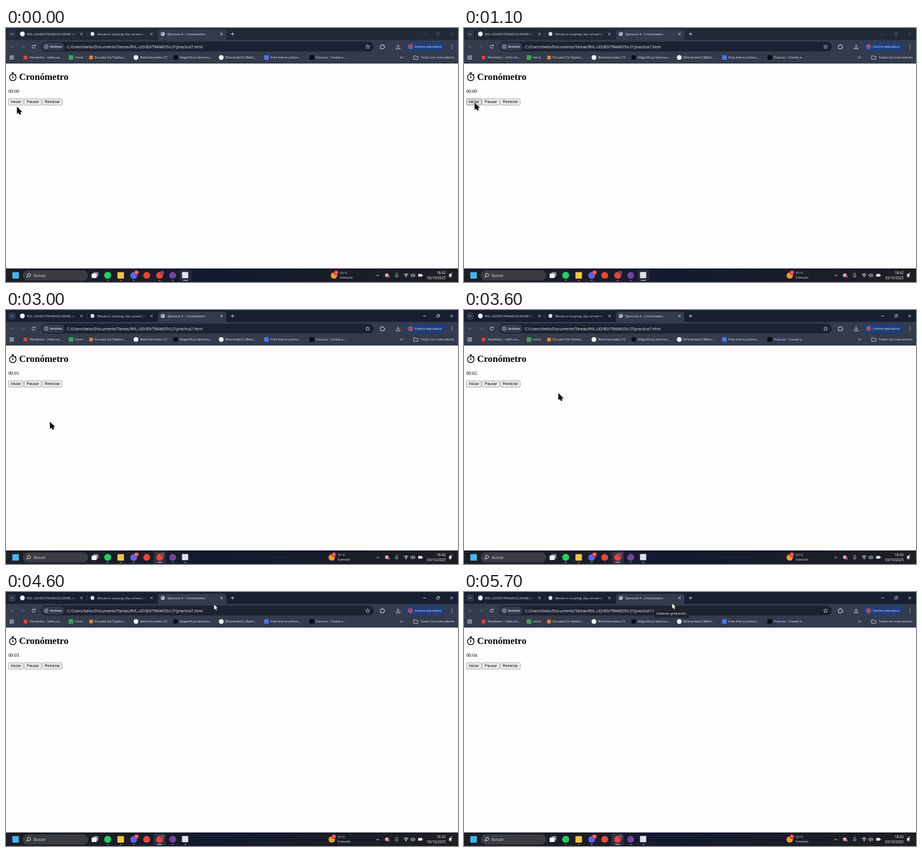
Recreate the animation shown at these times as an HTML page with a canvas. Size 800x450 px, loop 5.8 s.

```html
<!DOCTYPE html>
<html lang="es">
<head>
<meta charset="utf-8">
<title>Cronómetro</title>
<style>
html, body { margin: 0; width: 100%; height: 100%; overflow: hidden; background: #fefefe; }
canvas { display: block; width: 800px; height: 450px; }
</style>
</head>
<body>
<canvas id="stage" width="800" height="450"></canvas>
<script>
const ctx = document.getElementById('stage').getContext('2d');
const LOOP = 5800, STEP = 100;
const UI = '"Open Sans", "Noto Sans", sans-serif';
const SERIF = '"Liberation Serif", "Times New Roman", serif';
const ARIAL = '"Liberation Sans", Arial, sans-serif';
const BAR = '#333b4c', FIELD = '#1c2230', INK = '#dfe3ec', MUTED = '#626a7c';

function box(x, y, w, h, r, fill, stroke, width = 0.7) {
  ctx.beginPath();
  ctx.roundRect(x, y, w, h, r);
  if (fill) { ctx.fillStyle = fill; ctx.fill(); }
  if (stroke) { ctx.strokeStyle = stroke; ctx.lineWidth = width; ctx.stroke(); }
}

function disc(x, y, r, fill, stroke, width = 0.9) {
  ctx.beginPath();
  ctx.arc(x, y, r, 0, Math.PI * 2);
  if (fill) { ctx.fillStyle = fill; ctx.fill(); }
  if (stroke) { ctx.strokeStyle = stroke; ctx.lineWidth = width; ctx.stroke(); }
}

function square(x, y, size, fill, r = 1) {
  box(x - size / 2, y - size / 2, size, size, r, fill);
}

function line(pts, color = INK, width = 0.9) {
  ctx.beginPath();
  for (let i = 0; i < pts.length; i += 2) ctx.lineTo(pts[i], pts[i + 1]);
  ctx.strokeStyle = color;
  ctx.lineWidth = width;
  ctx.stroke();
}

function arc(x, y, r, from, to, color = INK, width = 0.9) {
  ctx.beginPath();
  ctx.arc(x, y, r, from, to);
  ctx.strokeStyle = color;
  ctx.lineWidth = width;
  ctx.stroke();
}

function shape(pts, fill, stroke, width = 0.8) {
  ctx.beginPath();
  for (let i = 0; i < pts.length; i += 2) ctx.lineTo(pts[i], pts[i + 1]);
  ctx.closePath();
  if (fill) { ctx.fillStyle = fill; ctx.fill(); }
  if (stroke) { ctx.strokeStyle = stroke; ctx.lineWidth = width; ctx.stroke(); }
}

function text(str, x, y, size = 6, color = INK, family = UI, weight = 400, align = 'left') {
  ctx.font = `${weight} ${size}px ${family}`;
  ctx.textAlign = align;
  ctx.fillStyle = color;
  ctx.fillText(str, x, y);
}

function cross(x, y, r, color = INK) {
  line([x - r, y - r, x + r, y + r], color);
  line([x - r, y + r, x + r, y - r], color);
}

function fadedTitle(str, x, end) {
  const fade = ctx.createLinearGradient(end - 12, 0, end, 0);
  fade.addColorStop(0, '#d3d8e3');
  fade.addColorStop(1, 'rgba(211,216,227,0)');
  text(str, x, 12.8, 6, fade);
}

function tabs(active) {
  ctx.fillStyle = active ? '#181f30' : '#232a37';
  ctx.fillRect(0, 0, 800, 22);
  box(4, 4, 13, 13, 4, '#2d3547');
  line([8.5, 9.7, 10.5, 11.7, 12.5, 9.7]);

  box(269, 3, 121, 22, 5, BAR);
  disc(29, 10.5, 4.2, '#f2f4f8');
  fadedTitle('RVL-UD/B3/TRAMO5/LEEME.md', 37, 125);
  cross(133.5, 10.5, 2);
  line([143.5, 6.5, 143.5, 15], '#48516a', 0.7);
  disc(153, 10.5, 3.4, '#d9dde5');
  fadedTitle('Movie to looping clip converter', 161.5, 248);
  cross(257.5, 10.5, 2);

  disc(277.5, 10.5, 3.6, '#c4cad6');
  shape([275, 8.5, 277.5, 8, 278, 10, 276, 11.5], '#5b6376');
  shape([278.5, 11, 280.3, 10.5, 279, 13], '#5b6376');
  text('Ejercicio 4 - Cronómetro', 286, 12.8, 5.97, '#f0f2f6');
  cross(381.5, 10.5, 2, '#fff');
  line([398, 10.5, 404, 10.5]);
  line([401, 7.5, 401, 13.5]);

  const c = active ? '#e6e9f0' : '#5c6473';
  line([738.5, 10.5, 743.5, 10.5], c, 0.8);
  box(762.3, 8.8, 4, 4, 0.7, null, c, 0.8);
  line([763.7, 7.8, 767.3, 7.8, 767.3, 11.5], c, 0.6);
  cross(788.8, 10.5, 2.3, c);
}

function toolbar() {
  ctx.fillStyle = BAR;
  ctx.fillRect(0, 21, 800, 42);
  for (const [x, d] of [[11, -1], [30, 1]]) {
    line([x - 3, 33, x + 3, 33], MUTED);
    line([x + d * 0.5, 30.3, x + d * 3, 33, x + d * 0.5, 35.7], MUTED);
  }
  arc(49, 33, 2.8, 0.3, 5.5);
  shape([52.3, 29.5, 52.3, 32.3, 49.6, 32.3], INK);

  box(62, 24.3, 589, 17.2, 8.6, FIELD);
  box(64, 26, 39.5, 13.8, 6.9, '#343c4e');
  disc(71.3, 33, 3, null, INK, 0.8);
  line([71.3, 32.5, 71.3, 34.7], INK, 0.8);
  line([71.3, 31, 71.3, 31.7], INK, 0.8);
  text('Archivo', 78, 35.2, 5.8, '#f0f2f6', UI, 600);
  text('C:/Users/belio/Documents/Tareas/RVL-UD/B3/TRAMO5/LI7/practica7.html', 108, 35.6, 7, '#eef0f5');

  const star = [];
  for (let i = 0; i < 10; i++) {
    const a = i * Math.PI / 5 - Math.PI / 2, r = i % 2 ? 1.7 : 3.8;
    star.push(640 + r * Math.cos(a), 33.2 + r * Math.sin(a));
  }
  shape(star, null, INK, 0.7);

  line([662.8, 30.6, 665, 30.6, 665, 29.3, 667, 29.3, 667, 30.6, 669, 30.6, 669, 32.5,
    670.2, 32.5, 670.2, 34.5, 669, 34.5, 669, 36.8, 662.8, 36.8, 662.8, 30.6], INK, 0.9);
  line([694, 29, 694, 34.3]);
  line([691.8, 32.2, 694, 34.4, 696.2, 32.2]);
  line([690.6, 34.8, 690.6, 36.9, 697.4, 36.9, 697.4, 34.8]);

  box(706.5, 24.8, 71, 16.4, 8.2, '#1f3f7c');
  disc(716, 33, 4.6, '#a0505c');
  text('Centro educativo', 723.5, 35.2, 6, '#e2eafc');
  for (const dy of [-3, 0, 3]) disc(789.3, 33 + dy, 0.8, INK);
}

function bookmarks(hover) {
  if (hover) {
    ctx.globalAlpha = hover;
    box(292, 45.5, 80, 14, 7, '#454d60');
    ctx.globalAlpha = 1;
  }
  for (const x of [6.8, 10.8]) for (const y of [49, 53]) box(x, y, 2.6, 2.6, 0.3, null, INK, 0.8);
  square(34.5, 52.2, 6.5, '#e0463b');
  square(115, 52.2, 8, '#39a852');
  square(150.5, 52.2, 6.5, '#ee8432');
  disc(230, 52.2, 4.2, '#f2f4f8');
  square(300.3, 52.2, 7.5, '#0b0d12', 0);
  disc(381, 52.2, 4.2, '#f2f4f8');
  square(461, 52.2, 8, '#4d74f2');
  square(541.3, 52.2, 8.4, '#0b0d12');
  const labels = [
    ['Recibidos - belio.va...', 42], ['Inicio', 122], ['Escuela De Tejidos...', 157],
    ['BelioVarandes-72', 237.5], ['Magníficas láminas...', 307.5], ['BVarandesO (Belio...', 388],
    ['Free line-to-photo...', 468], ['Trazuva - Create a...', 548], ['Todos los marcadores', 734]
  ];
  for (const [label, x] of labels) text(label, x, 54.4, 5.9);
  for (const x of [698, 700.7]) line([x, 50.4, x + 1.8, 52.2, x, 54], INK, 0.8);
  shape([721.5, 49.3, 724.2, 49.3, 725.3, 50.4, 729, 50.4, 729, 55.4, 721.5, 55.4], null, INK, 0.8);
}

function button(label, x, w, over) {
  box(x + 0.4, 125.4, w - 0.8, 11.2, 1.6, over ? '#e2e4e6' : '#efefef', over ? '#55606c' : '#888', 0.75);
  text(label, x + w / 2, 133, 6.94, '#000', ARIAL, 400, 'center');
}

function page(t, x, y) {
  ctx.fillStyle = '#fefefe';
  ctx.fillRect(0, 63, 800, 363);
  disc(12, 87.6, 5.8, null, '#000', 1.4);
  line([12, 81.8, 12, 79.6], '#000', 1.7);
  line([9.8, 79.4, 14.2, 79.4], '#000', 1.4);
  line([16.3, 82, 17.8, 83.5], '#000', 1.4);
  line([12, 88, 12, 83.8], '#000', 1.1);
  disc(12, 87.8, 1.1, '#000');
  text('Cronómetro', 23.2, 92, 16.67, '#000', SERIF, 700);

  const secs = Math.max(0, Math.floor((t - 1100) / 1000));
  text('00:' + String(secs).padStart(2, '0'), 4.2, 115, 8.33, '#000', SERIF);
  button('Iniciar', 4, 27, x < 31 && y < 137);
  button('Pausar', 32, 31);
  button('Reiniciar', 64.3, 35.5);
}

function badge(x, y, label) {
  disc(x, y, 4, '#d8324a');
  text(label, x, y + 1.7, 4.6, '#fff', UI, 600, 'center');
}

function taskbar(t, active) {
  const bg = ctx.createLinearGradient(0, 0, 800, 0);
  bg.addColorStop(0, '#1c1f26');
  bg.addColorStop(0.3, '#1a1d29');
  bg.addColorStop(0.46, '#121a31');
  bg.addColorStop(0.7, '#191d29');
  bg.addColorStop(1, '#1e1e23');
  ctx.fillStyle = bg;
  ctx.fillRect(0, 426, 800, 24);

  square(17, 438.3, 11.6, '#45b5ef');
  box(30, 430, 115, 17, 8.5, '#3a3c41', '#494b50', 0.5);
  disc(40.7, 437.6, 2.8, null, '#f0f1f4', 1);
  line([38.7, 439.7, 36.6, 441.9], '#f0f1f4', 1.1);
  text('Buscar', 49, 441, 6.7, '#d7d9df');

  const focus = active ? 272 : 317.5;
  box(focus - 10.5, 428, 21, 20.5, 2.5, active ? '#303440' : '#282939');

  box(154.5, 432.5, 9, 8, 1, '#858a96');
  box(151.5, 435, 9, 8, 1, '#f0f1f4');
  disc(180, 438.2, 6.2, '#27cc62');
  square(203, 438.2, 11.5, '#f5c34b');
  disc(226, 438.4, 6, '#5865e8');
  badge(231, 433.5, '9+');
  disc(249, 438.2, 6.1, '#e4473c');
  disc(272, 438.2, 6.1, '#e4473c');
  disc(276.7, 433.7, 3.4, '#7d4660');
  disc(295, 438.2, 6.1, '#71449f');
  square(317, 437.8, 11, '#dce1ea');
  for (const x of [180, 203, 226, 295]) box(x - 1.7, 446.6, 3.4, 1.2, 0.6, '#8b8f9a');
  for (const x of [272, 317.5]) {
    const on = x === focus, w = on ? 8.6 : 3.4;
    box(x - w / 2, 446.6, w, 1.3, 0.6, on ? '#d993c2' : '#8b8f9a');
  }

  const dx = -4 * ease((t - 100) / 400);
  disc(580.5 + dx, 438.5, 5.6, '#f29a2e');
  badge(584.3 + dx, 433.6, '4');
  text('31°C', 591 + dx, 436, 6.1, '#f6f7f9');
  text('Soleado', 590.8 + dx, 444.4, 6.1, '#dcdee3');
  tray();
}

function tray() {
  const c = '#eceef2';
  line([655.6, 439.7, 658, 437.3, 660.4, 439.7], c, 1);
  disc(674, 438, 3.2, '#b9bdc8');
  disc(677, 440.2, 2.2, '#dc3f49');
  box(690, 434, 2.8, 5, 1.4, null, '#b9bdc8', 0.8);
  arc(691.4, 438.2, 2.8, 0, Math.PI, '#b9bdc8', 0.8);
  line([691.4, 441, 691.4, 442.6], '#b9bdc8', 0.8);
  for (const r of [2, 3.8, 5.6]) arc(708.2, 441, r, -2.35, -0.79, c, 1);
  disc(708.2, 440.8, 0.9, c);
  shape([716.5, 437, 718, 437, 720, 435, 720, 441.5, 718, 439.6, 716.5, 439.6], null, c, 0.8);
  arc(720, 438.3, 2, -0.9, 0.9, c, 0.8);
  arc(720, 438.3, 3.8, -0.9, 0.9, c, 0.8);
  box(729.5, 435.8, 7, 4.8, 1, c);
  box(736.7, 437.2, 1, 2, 0.3, c);
  text('18:42', 778, 436.2, 6.3, '#f8f9fb', UI, 400, 'right');
  text('03/10/2025', 778, 444.5, 6.2, '#f8f9fb', UI, 400, 'right');
  shape([783.3, 440.3, 784.4, 438.6, 784.4, 436.3, 786.3, 434.5, 788.3, 436.3, 788.3, 438.6, 789.4, 440.3], c);
  line([785.3, 441.6, 787.4, 441.6], c, 1);
  text('z', 788, 436.2, 4.5, c, UI, 600);
}

function ease(p) {
  p = Math.min(1, Math.max(0, p));
  return p * p * (3 - 2 * p);
}

// time, x, y of the pointer
const PATH = [
  [0, 19.7, 140], [600, 19.7, 140], [900, 19, 132.8], [1200, 19, 132.8], [1900, 78, 198.5],
  [3300, 78, 198.5], [4100, 360, 38], [4500, 368, 21.7], [4800, 368, 21.7], [5100, 368.3, 20]
];

function pointer(t) {
  const i = PATH.findIndex(p => p[0] > t);
  if (i < 0) return PATH[PATH.length - 1].slice(1);
  const a = PATH[i - 1], b = PATH[i], p = ease((t - a[0]) / (b[0] - a[0]));
  return [a[1] + (b[1] - a[1]) * p, a[2] + (b[2] - a[2]) * p];
}

function cursor(x, y) {
  ctx.save();
  ctx.translate(x, y);
  if (y > 24 && y < 42) {
    for (const [color, w] of [['#aeb4c0', 2], ['#080a0e', 1]]) {
      line([0, -4, 0, 5], color, w);
      line([-2.4, -4.5, 2.4, -4.5], color, w);
      line([-2.4, 5, 2.4, 5], color, w);
    }
  } else {
    const light = y < 24, k = light ? 0.82 : 1;
    const arrow = [0, 0, 0, 11.8, 2.6, 9.4, 4.4, 13.2, 6.7, 12.2, 5, 8.5, 8.5, 8.5];
    ctx.scale(k, k);
    if (!light) shape(arrow, null, '#fff', 1.8);
    shape(arrow, light ? '#fff' : '#000', light ? '#10131b' : '#000', 0.6);
  }
  ctx.restore();
}

function draw(t) {
  const active = t >= 1200;
  const [x, y] = pointer(t);
  const hover = y > 45 && y < 60 ? 1 : 0.6 * (t >= 4000 && t <= 4100);
  tabs(active);
  toolbar();
  bookmarks(hover);
  page(t, x, y);
  taskbar(t, active);
  if (t >= 5100) {
    box(336.3, 30, 62, 15.5, 2.5, '#20242f', '#2b303c', 0.6);
    text('Detener grabación', 341, 39.7, 6.1, '#f3f4f7');
  }
  cursor(x, y);
}

function tick(now) {
  draw(Math.floor(now % LOOP / STEP) * STEP);
  requestAnimationFrame(tick);
}
draw(0);
requestAnimationFrame(tick);
</script>
</body>
</html>
```
